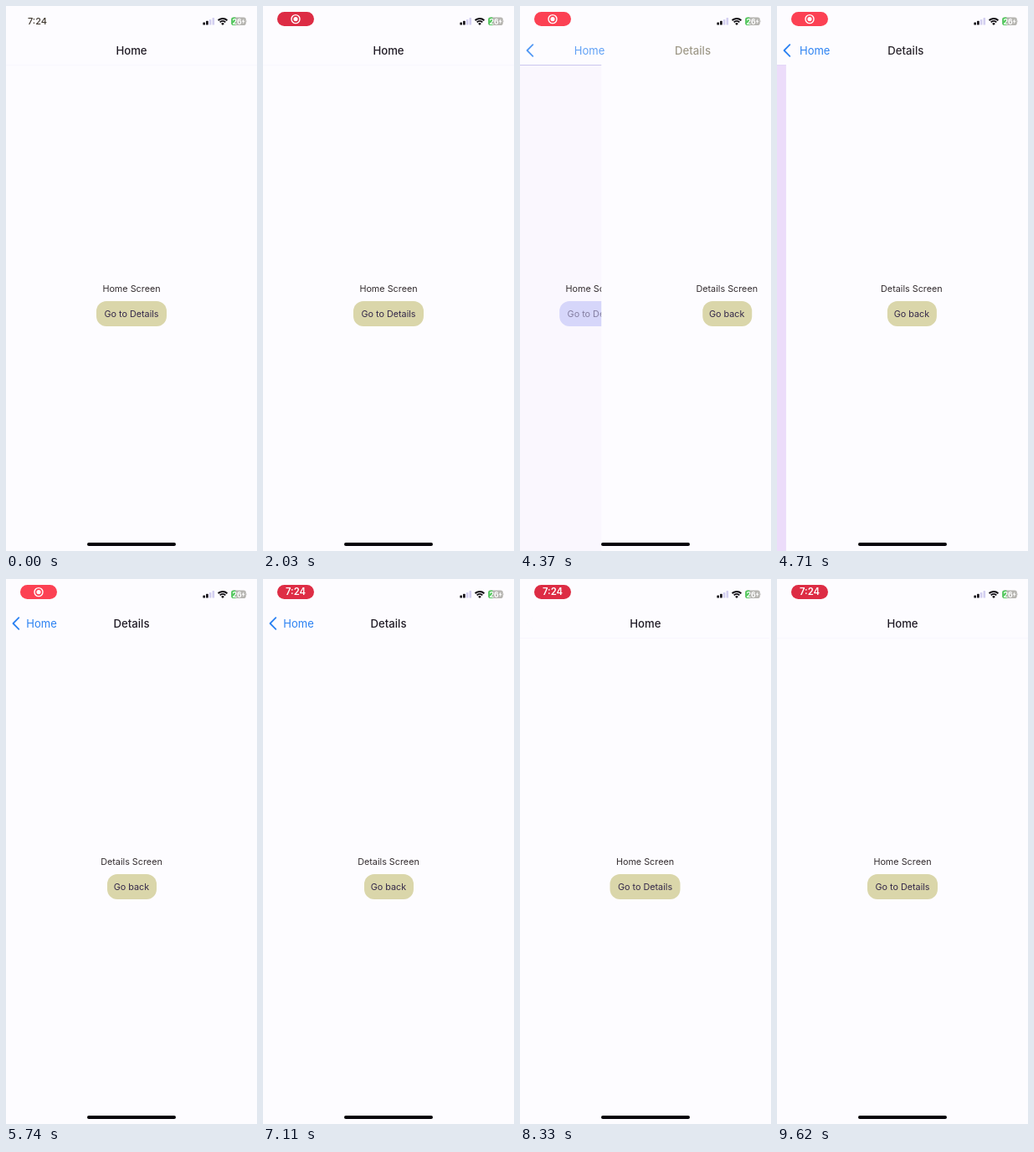
Animation of 300x650 px, one loop 9670 ms. Source, as an HTML page:

```html
<!DOCTYPE html>
<html lang="en">
<head>
<meta charset="utf-8">
<title>Stack navigation</title>
<style>
  html, body { margin: 0; width: 100%; height: 100%; overflow: hidden; background: #fdfcff; }
  body { font: 400 10.8px/16px Inter, "Liberation Sans", sans-serif; color: #342d30; }
  div, svg { position: absolute; }
  #stage { left: 0; top: 0; width: 300px; height: 650px; overflow: hidden; background: #fdfcff; }
  .view { left: 0; top: 70px; width: 300px; height: 580px; background: #fdfcff; }
  .view .text { left: 0; width: 300px; top: 260px; text-align: center; }
  .btn { top: 282px; height: 30px; line-height: 31px; border-radius: 12px; text-align: center; background: #dad6aa; color: #34284a; }
  #homeBtn { left: 108px; width: 84px; }
  #backBtn { left: 120.5px; width: 59px; }
  #line { left: 0; top: 70px; width: 300px; height: 1px; background: #c9c5ef; }
  .nav { top: 43px; left: 0; width: 300px; line-height: 20px; text-align: center; }
  .title { font-size: 13.2px; font-weight: 500; color: #211c26; }
  .label { font-size: 13px; color: #2c82f2; }
  #clock, #pillTime { top: 0; line-height: 17px; text-align: center; font-weight: 600; }
  #clock { left: 17px; top: 10px; width: 41px; font-size: 11px; font-weight: 500; color: #3f372e; }
  #pill { left: 17px; top: 7px; width: 44px; height: 17px; border-radius: 8.5px; }
  #pillTime { left: 0; width: 44px; font-size: 11.3px; color: #fff; }
  #bar { left: 97px; top: 639.5px; width: 106px; height: 4px; border-radius: 2px; background: #050308; }
</style>
</head>
<body>
<div id="stage">
  <div id="home" class="view">
    <div class="text">Home Screen</div>
    <div id="homeBtn" class="btn"><span id="homeBtnText">Go to Details</span></div>
  </div>
  <div id="line"></div>
  <div id="details" class="view">
    <div class="text">Details Screen</div>
    <div id="backBtn" class="btn">Go back</div>
  </div>

  <div id="homeTitle" class="nav title">Home</div>
  <div id="homeLabel" class="nav label">Home</div>
  <div id="detailsTitle" class="nav title">Details</div>
  <svg id="chevron" style="left:0;top:40px" width="24" height="26" fill="none">
    <path d="M15.3 6.2 8.5 13l6.8 6.8" stroke="#2c82f2" stroke-width="1.8" stroke-linecap="round" stroke-linejoin="round"/>
  </svg>

  <div id="clock">7:24</div>
  <div id="pill">
    <svg id="rec" width="44" height="17" fill="none" style="left:0;top:0">
      <circle cx="22" cy="8.6" r="5" stroke="#fff" stroke-width="1.4"/>
      <circle cx="22" cy="8.6" r="2.6" fill="#fff"/>
    </svg>
    <div id="pillTime">7:24</div>
  </div>
  <svg style="left:230px;top:8px" width="64" height="20" fill="none">
    <g fill="#0d0a10">
      <rect x="5.4" y="11.4" width="2.6" height="3.2" rx=".7"/>
      <rect x="9.1" y="9.8" width="2.6" height="4.8" rx=".7"/>
    </g>
    <g fill="#d3cff0">
      <rect x="12.8" y="8" width="2.6" height="6.6" rx=".7"/>
      <rect x="16.5" y="6" width="2.6" height="8.6" rx=".7"/>
    </g>
    <g stroke="#0d0a10" stroke-width="1.9">
      <path d="M23.6 9.2a7.7 7.7 0 0 1 10.8 0"/>
      <path d="M25.7 11.4a4.7 4.7 0 0 1 6.6 0"/>
    </g>
    <path d="M29 14.9l-1.9-2a2.7 2.7 0 0 1 3.8 0z" fill="#0d0a10"/>
    <rect x="39.2" y="5.6" width="17.6" height="9.4" rx="2.8" fill="#b5b4b0"/>
    <path d="M44.4 5.6H42a2.8 2.8 0 0 0-2.8 2.8v3.8A2.8 2.8 0 0 0 42 15h2.4z" fill="#55ca60"/>
    <path d="M57.5 8.8q1.2 1.5 0 3z" fill="#b5b4b0"/>
    <text x="40.4" y="13.5" font-size="8.8" font-weight="700" fill="#fff">26</text>
    <path d="M54.4 7 51.8 10.8h1.7L52.8 13.8 55.6 9.8h-1.7z" fill="#fff"/>
  </svg>
  <div id="bar"></div>
</div>
<script>
  const LOOP = 9670;
  const SCREEN = { rate: 8.23, push: 4088, pop: 7440 };
  const TITLE = { rate: 10.1, push: 4162, pop: 7495 };
  const el = {};
  document.querySelectorAll('[id]').forEach(e => el[e.id] = e);

  const clamp = v => Math.min(1, Math.max(0, v));
  const ramp = (t, a, b) => {
    const u = clamp((t - a) / (b - a));
    return u * u * (3 - 2 * u);
  };
  const mix = (a, b, u) => a.map((v, i) => v + (b[i] - v) * u);
  const rgb = c => `rgb(${c.map(Math.round)})`;
  const shift = (e, x) => e.style.transform = `translateX(${x}px)`;
  const fade = (e, a) => e.style.opacity = clamp(a);

  // Critically damped spring: travelled share after ms
  const spring = (ms, rate) => {
    const x = Math.max(0, ms) * rate / 1000;
    const left = (1 + x) * Math.exp(-x);
    return left < 0.002 ? 1 : 1 - left;
  };
  // 0 on the home screen, 1 on the details screen
  const progress = (t, { rate, push, pop }) => spring(t - push, rate) - spring(t - pop, rate);

  const PAPER = [253, 252, 255], DIM = [232, 214, 249];
  const OLIVE = [218, 214, 170], LILAC = [214, 214, 251], GREY = [177, 176, 162];
  const INK = [33, 28, 38], TAUPE = [168, 162, 144];
  const PLUM = [52, 40, 74], PALE = [214, 203, 248];
  const DARK_RED = [221, 44, 68], RED = [252, 65, 83];

  function drawScreens(t) {
    const q = progress(t, SCREEN);
    shift(el.home, -90 * q);
    shift(el.details, 300 * (1 - q));
    el.home.style.background = rgb(mix(PAPER, DIM, q ** 5));
    fade(el.line, 0.08 + 4 * q * (1 - q));

    const press = ramp(t, 3930, 4080) - ramp(t, 4250, 4490);
    const soft = clamp(press * 2);
    const base = t > SCREEN.pop ? mix(OLIVE, GREY, clamp(q * 2)) : OLIVE;
    el.homeBtn.style.background = rgb(mix(base, LILAC, soft));
    fade(el.homeBtn, 1 - 0.6 * clamp(press * 2 - 1));
    fade(el.homeBtnText, 1 - 0.5 * soft);

    const back = t < 8500 ? ramp(t, 7300, 7450) : 0;
    el.backBtn.style.background = rgb(mix(OLIVE, PAPER, back));
    el.backBtn.style.color = rgb(mix(PLUM, PALE, back));
  }

  function drawHeader(t) {
    const s = 1 - progress(t, TITLE);
    const x = -107.5 * (1 - s);
    shift(el.homeTitle, x);
    shift(el.homeLabel, x);
    shift(el.detailsTitle, 150 * s);
    fade(el.homeTitle, (s - 0.5) * 2);
    fade(el.homeLabel, 1.2 * (1 - s));
    fade(el.chevron, 1.3 * (1 - s));
    el.detailsTitle.style.color = rgb(mix(INK, TAUPE, clamp(2.5 * s)));
    fade(el.detailsTitle, 1 - ramp(s, 0.4, 1));
  }

  function drawPill(t) {
    const shown = ramp(t, 300, 600);
    const bright = ramp(t, 3200, 4000) - ramp(t, 6400, 7200);
    const time = ramp(t, 6500, 6800);
    fade(el.clock, 1 - shown);
    fade(el.pill, shown);
    el.pill.style.background = rgb(mix(DARK_RED, RED, bright));
    fade(el.rec, 1 - time);
    fade(el.pillTime, time);
  }

  const start = performance.now();
  function tick(now) {
    const t = Math.max(0, now - start) % LOOP;
    drawScreens(t);
    drawHeader(t);
    drawPill(t);
    requestAnimationFrame(tick);
  }
  tick(start);
</script>
</body>
</html>
```
